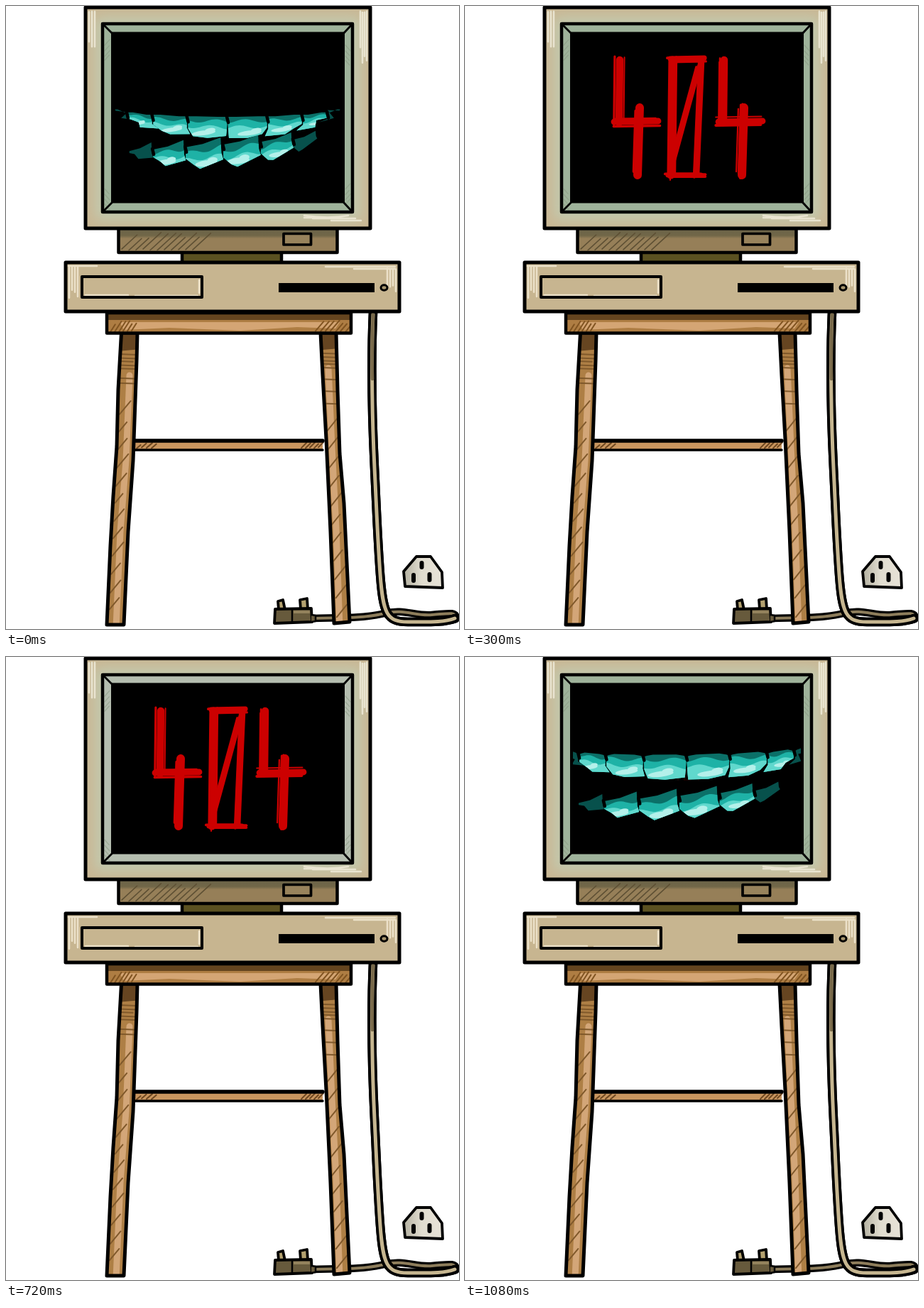
Animation of 638 by 877 pixels, one loop 1.2 s. Source, as an HTML page with a canvas:

```html
<!DOCTYPE html>
<html lang="en">
<head>
<meta charset="utf-8">
<title>404</title>
<style>
html, body { margin: 0; width: 638px; height: 877px; overflow: hidden; background: #fff; }
svg { position: absolute; left: 0; top: 0; }
canvas { position: absolute; left: 148px; top: 37px; }
.ink { stroke: #000; stroke-linejoin: round; stroke-linecap: round; }
.line, .hatch { fill: none; stroke-linecap: round; stroke-linejoin: round; }
</style>
</head>
<body>
<svg width="638" height="877" viewBox="0 0 638 877">
  <defs>
    <filter id="soft" x="-20%" y="-20%" width="140%" height="140%"><feGaussianBlur stdDeviation="9"/></filter>
    <clipPath id="frame"><rect x="112" y="2" width="401" height="311"/></clipPath>
    <clipPath id="top"><path d="M142 432H486V460H142Z"/></clipPath>
    <clipPath id="legL"><path id="pl" d="M162.500 460H185L184 500 179 640 172 740 166 871 142 871 147 760 151 690 156 620 158 540Z"/></clipPath>
    <clipPath id="legR"><path id="pr" d="M443 460H465L467 540 470 630 476 700 484 867 462 869 457 740 451 610 446 520Z"/></clipPath>
    <linearGradient id="shade" x2="0" y2="1">
      <stop offset="0" stop-color="#6b6349"/><stop offset=".3" stop-color="#716748"/>
      <stop offset=".42" stop-color="#967f58"/><stop offset="1" stop-color="#967f58"/>
    </linearGradient>
    <linearGradient id="face"><stop offset="0" stop-color="#b3b0a0"/><stop offset=".45" stop-color="#e0dccf"/><stop offset="1" stop-color="#e8e3d8"/></linearGradient>
  </defs>

  <!-- cable -->
  <g class="line">
    <path d="M433 862C470 861 505 862 533 855S575 859 600 857 632 853 634 860" stroke="#000" stroke-width="10.500"/>
    <path d="M433 862C470 861 505 862 533 855S575 859 600 857 632 853 633 860" stroke="#8d7d5b" stroke-width="4"/>
    <path id="cord" d="M517 432C514 500 516 590 519 650S523 745 527 800 536 867 566 867 616 868 633 862" stroke="#000" stroke-width="12.500"/>
    <use href="#cord" stroke="#c6b690"/>
    <path d="M517 434C514 500 516 590 519 650S523 745 527 800 536 867 566 867 616 868 632 862" stroke="#c6b690" stroke-width="5"/>
    <path d="M517 434Q515 480 516 525" stroke="#78694a" stroke-width="4.500"/>
  </g>

  <!-- legs -->
  <path d="M180 612H446V625H180Z" fill="#c9965f"/>
  <g id="barGrain" class="hatch" stroke="#6f4820" stroke-width="2"/>
  <path class="line" d="M180 612H446" stroke="#000" stroke-width="5.500"/>
  <path class="line" d="M180 625H446" stroke="#000" stroke-width="3.500"/>
  <g clip-path="url(#legL)">
    <path d="M140 460H190V875H140Z" fill="#ae7f45"/>
    <path class="line" d="M174 520L169 640 161 740 155 875" stroke="#d3a678" stroke-width="9"/>
    <path d="M155 460H190V483L155 486Z" fill="#664521"/>
    <g id="grainL" class="hatch" stroke="#80592b" stroke-width="2"/>
  </g>
  <g clip-path="url(#legR)">
    <path d="M435 460H490V875H435Z" fill="#ae7f45"/>
    <path class="line" d="M454 510L459 620 465 735 470 875" stroke="#d3a678" stroke-width="9"/>
    <path d="M435 460H470V482L435 485Z" fill="#664521"/>
    <g id="grainR" class="hatch" stroke="#80592b" stroke-width="2"/>
  </g>
  <g class="ink" fill="none" stroke-width="5"><use href="#pl"/><use href="#pr"/></g>

  <!-- table top -->
  <g clip-path="url(#top)">
    <path d="M142 432H486V460H142Z" fill="#ae7d43"/>
    <path d="M160 445H470L464 454 410 452 330 457 230 453 166 456Z" fill="#d4a574"/>
    <path d="M142 432H486V442H142Z" fill="#65451f"/>
    <g id="grainTop" class="hatch" stroke="#805421" stroke-width="2"/>
  </g>
  <rect class="ink" x="142" y="432" width="344" height="28.500" fill="none" stroke-width="4.500"/>

  <!-- base unit -->
  <rect class="ink" x="248" y="345" width="140" height="20" fill="#5b5121" stroke-width="4.500"/>
  <rect class="ink" x="84" y="361" width="470" height="69" fill="#c7b590" stroke-width="5"/>
  <g id="shineBase" class="hatch" stroke="#ece1c9" stroke-width="2.500">
    <path d="M88 366h40M450 367h98M490 370h58M112 407h60m10 1h88M272 386v18"/>
  </g>
  <rect class="ink" x="107" y="381" width="169" height="29" fill="none" stroke-width="4"/>
  <path d="M384 390H519V403H384Z"/>
  <ellipse class="ink" cx="532.500" cy="396.500" rx="4.500" ry="3.700" fill="#a9976f" stroke-width="3"/>

  <!-- monitor foot -->
  <rect class="ink" x="158.500" y="313" width="308" height="34" fill="url(#shade)" stroke-width="4.500"/>
  <g id="footHatch" class="hatch" stroke="#5e5034" stroke-width="1.600"/>
  <rect class="ink" x="391" y="320.500" width="38.500" height="15.500" fill="#98835c" stroke-width="3.700"/>

  <!-- monitor -->
  <rect x="112" y="2" width="401" height="311" fill="#c9b794"/>
  <g clip-path="url(#frame)">
    <rect x="126" y="16" width="373" height="285" fill="#c2cbb0" filter="url(#soft)"/>
    <g id="shineFrame" class="hatch" stroke="#e9e4d0" stroke-width="2.500">
      <path d="M420 295q35 5 62 0m-50 4h60m-72-1h10m28 4h42"/>
    </g>
  </g>
  <rect class="ink" x="112" y="2" width="401" height="311" fill="none" stroke-width="5"/>
  <rect id="bezel" x="136" y="25" width="352" height="265"/>
  <g id="bezelHatch" class="hatch" stroke="#869780" stroke-width="1.300" opacity=".55"/>
  <path class="line" d="M136 25L149 38M488 25L476 38M136 290L149 277M488 290L476 277" stroke="#000" stroke-width="2.800"/>
  <rect class="ink" x="136" y="25" width="352" height="265" fill="none" stroke-width="4.500"/>
  <path d="M148 36.500H477V277.500H148Z"/>

  <!-- plug and socket -->
  <g class="ink" stroke-width="3.800">
    <path d="M384 850L383 838 390 836 393 850ZM415 849L414 836 424 834 425 849Z" fill="#b3a16f"/>
    <path d="M379 849L430 848 431 867 378 869Z" fill="#675a3c"/>
    <path d="M405 851H428V855H405Z" fill="#94835d" stroke="none"/>
    <path d="M403 850V866M430 857L436 858V866L430 867" fill="#675a3c" stroke-width="2.500"/>
    <path d="M578 775H598L614 797 615 819 562 817 560 796Z" fill="url(#face)"/>
    <path class="line" d="M585.500 784v6M574 801v8M596.500 800v8" stroke-width="6"/>
  </g>
</svg>
<canvas id="screen" width="328" height="240"></canvas>

<script>
const start = performance.now();
const ctx = document.getElementById('screen').getContext('2d');
const bezel = document.getElementById('bezel');
const TEAL = ['#0b7068', '#1eb2a6', '#60d8cd', '#b4f0ea'];
const MURKY = ['#07514c', '#0d8a80'];
const ARC = .36;   // angle between neighbouring teeth around the jaw

let seed = 7;
const random = () => (seed = seed * 16807 % 2147483647) / 2147483647;
const jitter = r => (random() - .5) * 2 * r;
const mix = (a, b, k) => a + (b - a) * k;
const clamp = v => Math.min(1, Math.max(0, v));
const smooth = v => v * v * (3 - 2 * v);

// A run of loose parallel pen lines
function hatch(id, count, x, y, stepX, stepY, dx, dy) {
  const path = document.createElementNS('http://www.w3.org/2000/svg', 'path');
  let d = '';
  for (let i = 0; i < count; i++) {
    const k = mix(.7, 1.1, random());
    d += `M${x + stepX * i} ${y + stepY * i + jitter(1)}l${dx * k} ${dy * k}`;
  }
  path.setAttribute('d', d);
  document.getElementById(id).append(path);
}

hatch('barGrain', 4, 184, 622, 7, 0, 8, -7);
hatch('barGrain', 5, 416, 622, 6, 0, 7, -7);
hatch('grainL', 5, 160, 490, 0, 5, 25, 1);
hatch('grainL', 2, 158, 523, 0, 8, 26, 1);
hatch('grainL', 12, 160, 575, -1.300, 25, 15, -18);
hatch('grainR', 5, 441, 489, 0, 5, 28, 1);
hatch('grainR', 3, 444, 525, 1, 17, 26, 1);
hatch('grainR', 11, 451, 600, 1.500, 26, 16, -20);
hatch('grainTop', 6, 147, 458, 6, 0, 9, -14);
hatch('grainTop', 7, 436, 458, 7, 0, 12, -14);
hatch('shineBase', 4, 89, 367, 4, 0, 0, 45);
hatch('shineBase', 4, 537, 370, 4, 0, 0, 32);
hatch('footHatch', 11, 163, 343, 10, 0, 24, -22);
hatch('shineFrame', 3, 117, 8, 4, 0, 0, 50);
hatch('shineFrame', 4, 499, 8, 3, 0, 0, 65);
for (const x of [139, 478]) {
  const flip = x > 300 ? 1 : -1;
  hatch('bezelHatch', 4, x, 56, 0, 7, 7, 8 * flip);
  hatch('bezelHatch', 4, x, 258, 0, 7, 7, -8 * flip);
}

// Digits: each brush mark is a broad line with a few stray bristles beside it
const marks = [];
function brush(width, x1, y1, x2, y2) {
  const len = Math.hypot(x2 - x1, y2 - y1), ux = (x2 - x1) / len, uy = (y2 - y1) / len;
  marks.push([width * .8, x1, y1, x2, y2]);
  for (let i = 0; i < 3; i++) {
    const off = jitter(width * .6), a = jitter(5), b = jitter(7);
    marks.push([mix(2, 4, random()), x1 + ux * a - uy * off, y1 + uy * a + ux * off,
      x2 + ux * b - uy * off, y2 + uy * b + ux * off]);
  }
}
function four(x) {
  brush(13, x + 8, 76, x + 7, 164);
  brush(11, x, 163, x + 62, 162);
  brush(15, x + 36, 143, x + 33, 238);
}
four(210);
brush(14, 292, 76, 290, 238);
brush(9, 289, 74, 337, 73);
brush(11, 333, 76, 326, 236);
brush(9, 286, 238, 332, 238);
brush(7, 330, 84, 295, 212);
four(357);

function stroke(width, color, x1, y1, x2, y2) {
  ctx.lineWidth = width;
  ctx.strokeStyle = color;
  ctx.beginPath();
  ctx.moveTo(x1, y1);
  ctx.lineTo(x2, y2);
  ctx.stroke();
}

function digits(size) {
  const red = 204 * mix(.1, 1, size * size);
  ctx.save();
  ctx.translate(314, 157);
  ctx.scale(size, size);
  ctx.translate(-314, -157);
  marks.forEach(([w, ...ends]) => stroke(w, `rgb(${red | 0},0,0)`, ...ends));
  ctx.restore();
}

// Fill an outline, then layer wavy bands and a glint inside it
function tooth(outline, colors, levels, a, b, n) {
  ctx.beginPath();
  outline.forEach(p => ctx.lineTo(...p));
  ctx.closePath();
  ctx.fillStyle = colors[0];
  ctx.fill();
  ctx.save();
  ctx.clip();
  const w = b.x - a.x;
  levels.forEach((level, i) => {
    ctx.fillStyle = colors[i + 1];
    ctx.beginPath();
    for (let u = -.2; u < 1.25; u += .05) {
      const top = mix(a.top, b.top, u), h = mix(a.bottom, b.bottom, u) - top;
      ctx.lineTo(a.x + u * w, top + h * (level + .09 * Math.sin(u * 7 + n * 2 + i)));
    }
    ctx.lineTo(b.x + 20, 400);
    ctx.lineTo(a.x - 20, 400);
    ctx.fill();
  });
  if (levels.length > 1) {
    const cx = mix(a.x, b.x, n % 2 ? .4 : .55), top = (a.top + b.top) / 2, h = (a.bottom + b.bottom) / 2 - top;
    ctx.fillStyle = colors[3];
    ctx.beginPath();
    ctx.ellipse(cx, top + h * .82, w * .3, h * .12, -.12, 0, 7);
    ctx.ellipse(cx + w * .16, top + h * .7, w * .14, h * .12, -.2, 0, 7);
    ctx.fill();
  }
  ctx.restore();
}

const notch = (x, y) => stroke(4.5, '#000', x - 1, y - 1, x + 1, y + 7);

// Both rows sit on a cylinder that swells toward the viewer as the jaw lifts
function upperRow(lift) {
  const radius = 160 + lift * .9, dome = lift * .22, height = 29 + lift * .38, gap = 2 + lift * .02;
  const lean = .1 * clamp(1 - lift / 40);
  const side = n => {
    const dx = radius * Math.sin(ARC * n), back = 1 - Math.cos(ARC * n), base = 185 - lift - dx * lift / 1000;
    return {
      x: 312 + dx, foot: 312 + dx * (1 - lean),
      top: base - height - back * Math.max(0, 12 - lift * .2),
      bottom: base - back * Math.max(0, 42 - lift * .5)
    };
  };
  if (lift > 25) for (let n = -3; n < 4; n++) {
    const { x, top } = side(n);
    stroke(13, TEAL[0], x - 5, top + dome + 7, x + 5, top + dome + 7);
  }
  for (let n = -4; n < 4; n++) {
    const a = side(n), b = side(n + 1), at = u => mix(a.x, b.x, u), far = n === -4 || n === 3;
    tooth([
      [a.x, a.top + dome], [at(.08), a.top + dome * .5], [at(.22), a.top], [at(.76), b.top],
      [at(.92), b.top + dome * .5], [b.x, b.top + dome], [b.x - gap / 2, mix(b.top, b.bottom, .6)],
      [b.foot - gap, b.bottom - 2], [at(.5), (a.bottom + b.bottom) / 2 + 2],
      [a.foot + gap, a.bottom + 1], [a.x + gap / 2, mix(a.top, a.bottom, .65)]
    ], far ? MURKY : TEAL, far ? [] : [.22, .52], a, b, n + 4);
  }
  if (lift < 25) for (let n = -3; n < 4; n++) notch(side(n).x, side(n).top + 1);
}

function lowerRow(lift) {
  const drop = smooth(clamp((lift - 10) / 70)), radius = 150 + lift * .8, rise = 5 + drop * 5;
  const side = (n, slope) => {
    const dx = radius * Math.sin(ARC * n), top = 190 + drop * 75 - dx * .07 + slope;
    return { x: 306 - lift * .3 + dx, top, bottom: top + (38 - drop * 26) * (Math.cos(ARC * n) * 1.4 - .4) - slope };
  };
  for (let n = -3; n < 3; n++) {
    const a = side(n, rise), b = side(n + 1, -rise), at = u => mix(a.x, b.x, u);
    const far = n === -3 || n === 2, dim = far || drop > .8;
    tooth([
      [a.x, a.top], [at(.45), mix(a.top, b.top, .4) + 1], [at(.93), b.top], [at(.95), mix(b.top, b.bottom, .5)],
      [b.x, mix(b.top, b.bottom, .72)], [at(.38), mix(a.bottom, b.bottom, .4) + 1],
      [at(.22), mix(a.top, a.bottom, .85)], [a.x, mix(a.top, a.bottom, .55)]
    ], dim ? MURKY : TEAL, far ? [] : dim ? [.4] : [.3, .6], a, b, n + 3);
  }
  if (lift < 25) for (let n = -2; n < 3; n++) notch(side(n, rise).x, side(n, rise).top);
}

function draw() {
  const tick = Math.floor((performance.now() - start) % 1200 / 60);
  const step = tick - (tick % 10 === 9);   // each half of the loop holds its last picture
  const opening = step < 10;
  const lift = 3.4 * (opening ? 1.55 * step : 20 - step) ** 2;
  const size = Math.min(1, opening ? step / 4 : ((20 - step) / 6.6) ** 1.37);
  const pale = step > 5 && step < 17 && step % 2 === 0 && step !== 10;

  ctx.setTransform(1, 0, 0, 1, -148, -37);
  ctx.fillStyle = '#000';
  ctx.fillRect(148, 37, 328, 240);
  ctx.lineCap = ctx.lineJoin = 'round';
  digits(size);
  if (lift < 150) {
    ctx.save();
    ctx.beginPath();
    ctx.rect(152, 40, 321, 233);
    ctx.clip();
    lowerRow(lift);
    upperRow(lift);
    ctx.restore();
  }
  bezel.setAttribute('fill', pale ? '#b5beb0' : '#9fb39b');
  requestAnimationFrame(draw);
}
draw();
</script>
</body>
</html>
```
